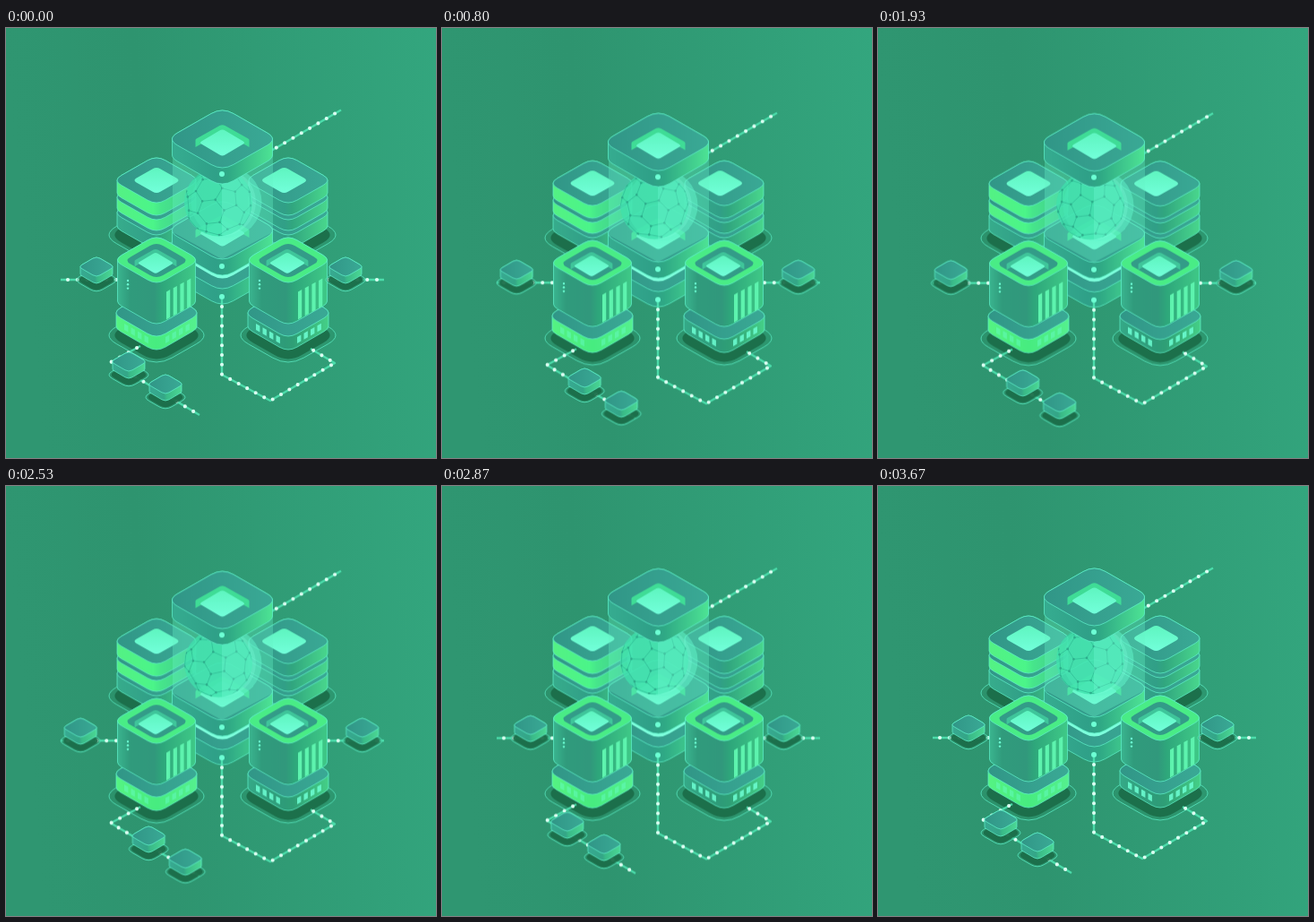
An HTML page for the animation above (3740 ms loop, 480 px wide and 480 px high).

```html
<!DOCTYPE html>
<html lang="en">
<head>
<meta charset="utf-8">
<title>Isometric servers</title>
<style>
html, body { margin: 0; width: 100%; height: 100%; overflow: hidden; background: #2f9872; }
svg { display: block; width: 100vw; height: 100vh; }
.move { animation: slide 3740ms infinite; }
@keyframes slide {
  0%, 4% { transform: translate(0, 0); animation-timing-function: cubic-bezier(.76, 0, .24, 1); }
  30% { transform: translate(var(--x), var(--y)); animation-timing-function: ease-in-out; }
  59.8% { transform: translate(calc(var(--x) * .98), calc(var(--y) * .98)); animation-timing-function: cubic-bezier(.76, 0, .24, 1); }
  85.2%, 100% { transform: translate(0, 0); }
}
</style>
</head>
<body>
<svg id="stage" viewBox="0 0 480 480"></svg>
<script>
const LOOP = 3740;
const MINT = '#6dffd4', EDGE = '#5ff2cb', GREEN = '#49ec86';

const gradient = (id, stops, dir = '') => `<linearGradient id="${id}" ${dir}>` +
  stops.map(([at, color]) => `<stop offset="${at}" stop-color="${color}"/>`).join('') + '</linearGradient>';

const defs = '<defs>' +
  gradient('bg', [[0, '#2f9671'], [.3, '#2e946f'], [1, '#33a67e']], 'x1="0" y1=".1" x2="1" y2="0"') +
  gradient('teal', [[0, '#319687'], [1, '#3aa995']]) +
  gradient('tower', [[0, '#36ac90'], [.44, '#2fa088'], [.56, '#2fa985'], [1, '#4de394']]) +
  gradient('rack', [[0, '#37ac8c'], [.45, '#319f87'], [.55, '#31a67f'], [1, '#49d78d']]) +
  gradient('lime', [[0, '#54f184'], [.46, '#4bf589'], [.56, '#46e58b'], [1, '#43c990']]) +
  gradient('body', [[0, '#3ab58f'], [.16, '#309b7c'], [.47, '#31987c'], [.58, '#2ea77b'], [1, '#3fc987']]) +
  gradient('base', [[0, '#35a987'], [.46, '#2e9b78'], [.56, '#2f9f76'], [1, '#45d087']]) +
  gradient('bright', [[0, '#55f383'], [.5, '#47ec80'], [1, '#55f08e']]) +
  gradient('small', [[0, '#38aa92'], [.45, '#34a687'], [.55, '#3abb88'], [1, '#4bd794']]) +
  gradient('pool', [[0, '#5ff5c0'], [1, '#72ffda']], 'x1="0" y1="0" x2="0" y2="1"') +
  '</defs>';

// Lower half of a rounded diamond, left to right, with visible half extents a and b.
function arc(a, b, k) {
  const rx = a / (1 - k / 2), ry = b / (1 - k / 2);
  return [[-a, 0], [-rx * (1 - k / 2), ry * k / 2], [-rx * (1 - k), ry * k],
    [-rx * k, ry * (1 - k)], [0, ry], [rx * k, ry * (1 - k)],
    [rx * (1 - k), ry * k], [rx * (1 - k / 2), ry * k / 2], [a, 0]];
}

function halfPath(points, sign, dy) {
  const p = points.map(([x, y]) => `${(x * sign).toFixed(2)} ${(y * sign + dy).toFixed(2)}`);
  return `L${p[0]}Q${p[1]} ${p[2]}L${p[3]}Q${p[4]} ${p[5]}L${p[6]}Q${p[7]} ${p[8]}`;
}

function outline(a, b, h = 0, k = .2) {
  const pts = arc(a, b, k);
  return `M${-a} 0` + halfPath(pts, 1, h) + halfPath(pts, -1, 0) + 'Z';
}

const at = (x, y, inner) => `<g transform="translate(${x} ${y})">${inner}</g>`;
const shape = (d, fill, extra = '') => `<path d="${d}" fill="${fill}" ${extra}/>`;
const rim = `stroke="${EDGE}" stroke-width=".9" stroke-opacity=".8"`;
const dot = (x, y, r, fill = MINT) => `<circle cx="${x}" cy="${y}" r="${r}" fill="${fill}"/>`;

const slab = (x, y, a, b, h, side, top = 'url(#teal)') => at(x, y,
  shape(outline(a, b, h), side, rim) + shape(outline(a, b), top, rim));

const tile = (x, y, a, b) => at(x, y, shape(outline(a, b, 0, .16), 'url(#pool)'));

// A recess: the back walls with their front ends, and the sunk floor.
const well = (x, y, size, wall) => `<g transform="translate(${x} ${y}) scale(${size})">` +
  shape('M-30 0Q-30 -1 -28 -2L-3 -16Q0 -17.5 3 -16L28 -2Q30 -1 30 0V8L23 4L0 17L-23 4L-30 8Z', wall) +
  at(0, 3, shape(outline(24.5, 14.5, 0, .12), 'url(#pool)')) + '</g>';

const platform = (x, y, a, b) => at(x, y,
  shape(outline(a, b, 0, .28), '#2a8f67', `fill-opacity=".45" stroke="${EDGE}" stroke-width=".9" stroke-opacity=".8"`) +
  shape(outline(a * .88, b * .88, 0, .28), '#1b6c49', 'fill-opacity=".9"'));

const wire = d => `<path d="${d}" fill="none" stroke="#50e8b4" stroke-width="2.4" stroke-opacity=".85" stroke-linejoin="round"/>` +
  `<path d="${d}" fill="none" stroke="#dcfff2" stroke-width="4.1" stroke-linecap="round" stroke-dasharray="0 10.8" stroke-dashoffset="-8"/>`;

function rack(x, tileX, side) {
  return slab(x, 206, 44, 25, 15, 'url(#rack)') + slab(x, 189, 44, 25, 12, side) +
    slab(x, 170, 44, 25, 14, side) + tile(tileX, 170, 24.5, 14);
}

function server(x, side, toothOpacity) {
  const slope = .57;
  let s = slab(x, 318, 45, 26, 15, side);
  const tooth = (tx, ty, k) =>
    `<path d="M${tx} ${ty}l4.4 ${4.4 * k}v7l-4.4 ${-4.4 * k}z" fill="${MINT}" fill-opacity="${toothOpacity}"/>`;
  for (let i = 0; i < 4; i++) {
    s += tooth(x - 36 + i * 7.5, 330 + i * 7.5 * slope, slope);
    s += tooth(x + 10 + i * 7.5, 345 - i * 7.5 * slope, -slope);
  }
  s += slab(x, 259, 43.5, 25, 46, 'url(#body)', GREEN);
  s += at(x, 259.5, shape(outline(32.5, 18.5), '#339c88'));
  s += well(x - 1, 260, .78, '#3fc59a');
  for (let i = 0; i < 4; i++)
    s += `<path d="M${x + 11 + i * 7.7} ${294.5 - i * 4.2}l4.2 -2.4v31l-4.2 2.4z" fill="#5df3ae"/>`;
  for (let i = 0; i < 3; i++) s += dot(x - 32, 282 + i * 4.3, 1.2);
  return s;
}

const cube = (x, y, dx, dy) => `<g class="move" style="--x:${dx}px;--y:${dy}px">` +
  platform(x, y + 14.7, 22, 12.6) + slab(x, y, 18, 10.5, 8, 'url(#small)') + '</g>';

const beam = 'M186 132L241 166L298 132V228L241 258L186 228Z';

const scene =
  wire('M374 91.5L296 137') +
  platform(168, 231, 53, 30) + platform(315, 231, 53, 30) +
  rack(168, 168, 'url(#lime)') + rack(315, 310.5, 'url(#rack)') +
  slab(241.5, 260, 55, 31, 17, 'url(#tower)') + dot(241, 300, 3) +
  at(241.5, 226, shape(outline(54, 31.5, 22), '#7dffdc')) +
  slab(241.5, 226, 56, 32, 18, 'url(#tower)') + dot(241, 266, 3) +
  well(241.5, 226, 1, '#3fdc96') +
  shape(beam, '#63f0c4', 'fill-opacity=".34"') +
  dot(246, 194.5, 39.5, 'rgba(98,246,204,.5)') +
  '<clipPath id="ball"><circle cx="237" cy="194.5" r="38"/></clipPath>' +
  dot(237, 194.5, 38, 'rgba(63,226,172,.75)') +
  '<g clip-path="url(#ball)" stroke-opacity=".75"><path id="net" fill="none" stroke="#2fb892" stroke-width=".9"/>' +
  '<path id="nodes" fill="none" stroke="#2aa586" stroke-width="2.8" stroke-linecap="round"/></g>' +
  shape('M241 156.5A38 38 0 0 1 241 232.5Z', '#7affdc', 'fill-opacity=".28"') +
  slab(241.5, 124, 56, 32, 18, 'url(#tower)') + dot(241, 163, 3) +
  well(241.5, 125, 1, '#3fdc96') +
  platform(168, 343, 53, 30) + platform(315, 343, 53, 30) +
  wire('M61 281H126') + wire('M422 281H354') +
  wire('M241 303V387L295 416L367 374L340 358') +
  wire('M216 432L117 373L150 355') +
  server(168, 'url(#bright)', .38) + server(315, 'url(#base)', .85) +
  cube(101, 266.5, -20, 0) + cube(379, 266.5, 21, 0) +
  cube(137, 372.5, 25, 16.5) + cube(178, 397.5, 25, 17);

document.getElementById('stage').innerHTML = defs +
  '<rect width="480" height="480" fill="url(#bg)"/>' +
  `<g class="move" style="--x:0px;--y:3.7px">${scene}</g>`;

// Football lattice: an icosahedron with its corners cut off.
const dist = (p, q) => Math.hypot(p[0] - q[0], p[1] - q[1], p[2] - q[2]);
const corners = [[0, 1, 0], [0, -1, 0]];
for (let i = 0; i < 10; i++) {
  const t = i * Math.PI / 5, r = 2 / Math.sqrt(5);
  corners.push([r * Math.cos(t), (i % 2 ? -.5 : .5) * r, r * Math.sin(t)]);
}
const knots = [];
for (const p of corners) for (const q of corners) {
  const d = dist(p, q);
  if (d > .1 && d < 1.2) {
    const v = p.map((c, i) => (2 * c + q[i]) / 3), n = Math.hypot(...v);
    knots.push(v.map(c => c / n));
  }
}
const links = [];
knots.forEach((p, i) => knots.forEach((q, j) => { if (i < j && dist(p, q) < .46) links.push([i, j]); }));

const net = document.getElementById('net'), nodes = document.getElementById('nodes');
const tilt = .45, roll = .25;

function project([x, y, z], turn) {
  const x1 = x * Math.cos(turn) + z * Math.sin(turn);
  const z1 = z * Math.cos(turn) - x * Math.sin(turn);
  const y2 = y * Math.cos(tilt) - z1 * Math.sin(tilt);
  const z2 = y * Math.sin(tilt) + z1 * Math.cos(tilt);
  return [237 + 38 * (x1 * Math.cos(roll) - y2 * Math.sin(roll)),
    194.5 - 38 * (x1 * Math.sin(roll) + y2 * Math.cos(roll)), z2];
}

function draw() {
  const turn = (performance.now() % LOOP) / LOOP * Math.PI * 2 / 5;
  const pts = knots.map(k => project(k, turn));
  const pos = p => p[0].toFixed(2) + ' ' + p[1].toFixed(2);
  net.setAttribute('d', links.filter(([i, j]) => pts[i][2] + pts[j][2] > 0)
    .map(([i, j]) => `M${pos(pts[i])}L${pos(pts[j])}`).join(''));
  nodes.setAttribute('d', pts.filter(p => p[2] > 0).map(p => `M${pos(p)}h0`).join(''));
  requestAnimationFrame(draw);
}
draw();
</script>
</body>
</html>
```
